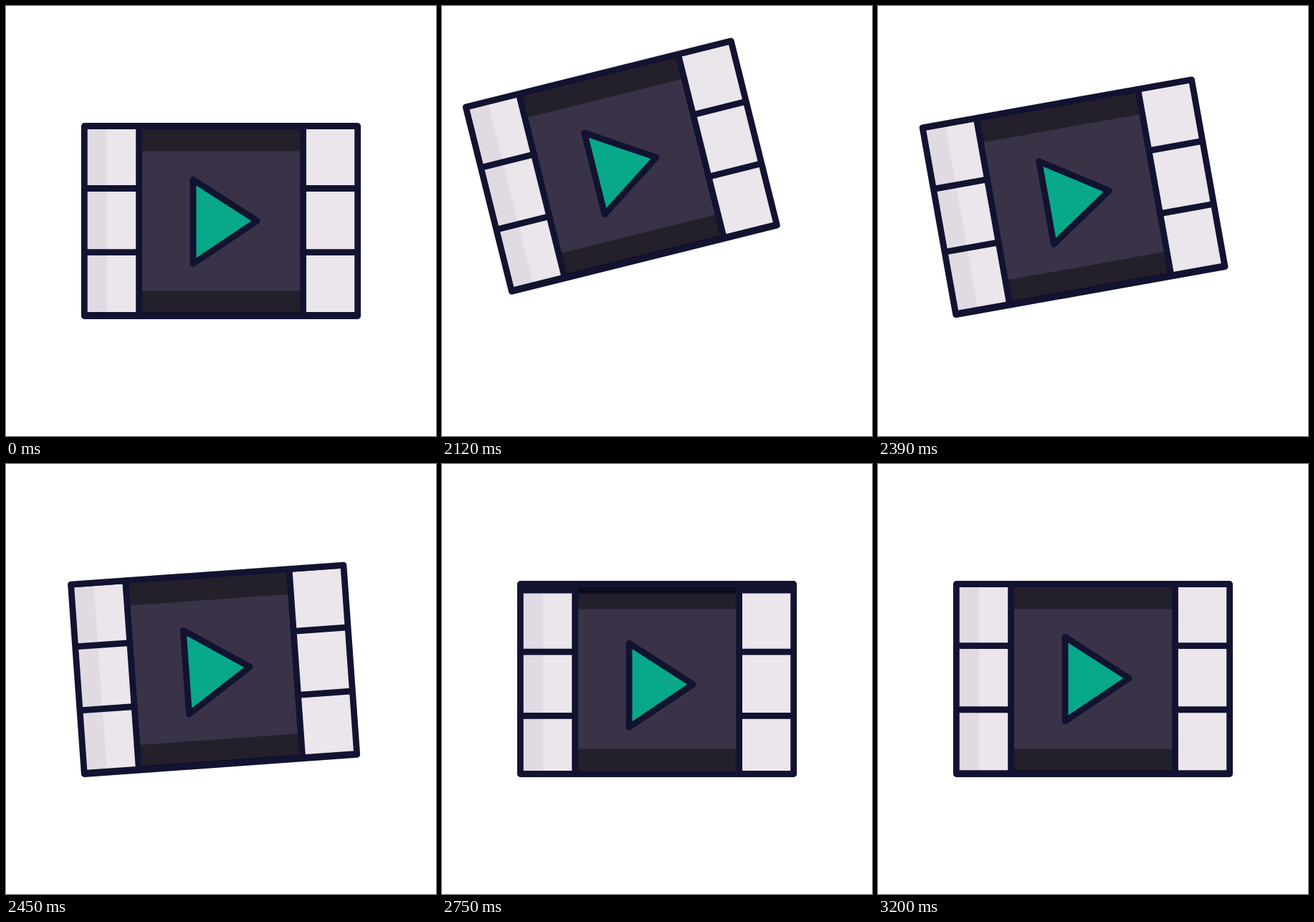
An HTML page for the animation above (3.29 s loop, 600 by 600 pixels).

```html
<!DOCTYPE html>
<html lang="en">
<head>
<meta charset="utf-8">
<title>Film strip</title>
<style>
html, body { margin: 0; width: 100%; height: 100%; overflow: hidden; background: #fff; }
svg { display: block; width: 100vw; height: 100vh; }
.line { fill: none; stroke: #121331; stroke-width: 8.8; stroke-linejoin: round; stroke-linecap: round; }
</style>
</head>
<body>
<svg viewBox="0 0 600 600">
  <defs>
    <clipPath id="window"><rect x="109.3" y="167.5" width="381.4" height="265"/></clipPath>
    <g id="cell">
      <path class="line" d="M109.3 167.5H490.7M109.3 432.5H490.7"/>
      <path class="line" d="M109.3 254.5H185.6M109.3 343.7H185.6M414.6 254.5H490.7M414.6 343.7H490.7"/>
      <path class="line" style="fill:#08a88a" d="M261.1 242.4L350.3 299.8L261.1 359.7Z"/>
    </g>
  </defs>
  <g id="strip">
    <g clip-path="url(#window)">
      <rect x="109.3" y="167.5" width="381.4" height="265" fill="#ebe6ec"/>
      <rect x="109.3" y="167.5" width="31.7" height="265" fill="#e0dbe3"/>
      <rect x="185.6" y="167.5" width="229" height="265" fill="#3a3347"/>
      <g id="film">
        <use href="#cell"/>
        <use href="#cell" y="264"/>
      </g>
      <path d="M185.6 171.9H414.6V202.5H185.6ZM185.6 397.5H414.6V428.1H185.6Z" opacity=".4"/>
    </g>
    <path class="line" d="M109.3 167.5H490.7V432.5H109.3ZM185.6 167.5V432.5M414.6 167.5V432.5"/>
  </g>
</svg>
<script>
const LOOP = 3290, REST = 2000, STEP = 30;
const strip = document.getElementById('strip');
const film = document.getElementById('film');

// Decelerating rise to 1 at `up`, then accelerating fall to 0 over `down`.
function toss(t, up, down, power) {
  if (t <= 0 || t >= up + down) return 0;
  return t < up ? Math.sin(Math.PI / 2 * t / up) : 1 - ((t - up) / down) ** power;
}

function draw(time) {
  const t = Math.floor((time - REST) / STEP) * STEP;
  const lift = 34.3 * toss(t, 118, 277, 3);
  const tilt = 17.9 * toss(t, 210, 273, 2);
  const roll = t > 481 ? 265 * (1 - Math.exp(-0.0127 * (t - 481))) : 0;
  strip.setAttribute('transform',
    `translate(${-0.35 * lift} ${-lift}) rotate(${-tilt} 109.3 432.5)`);
  film.setAttribute('transform', `translate(0 ${-roll})`);
}

const start = performance.now();
function tick() {
  draw((performance.now() - start) % LOOP);
  requestAnimationFrame(tick);
}
tick();
</script>
</body>
</html>
```
